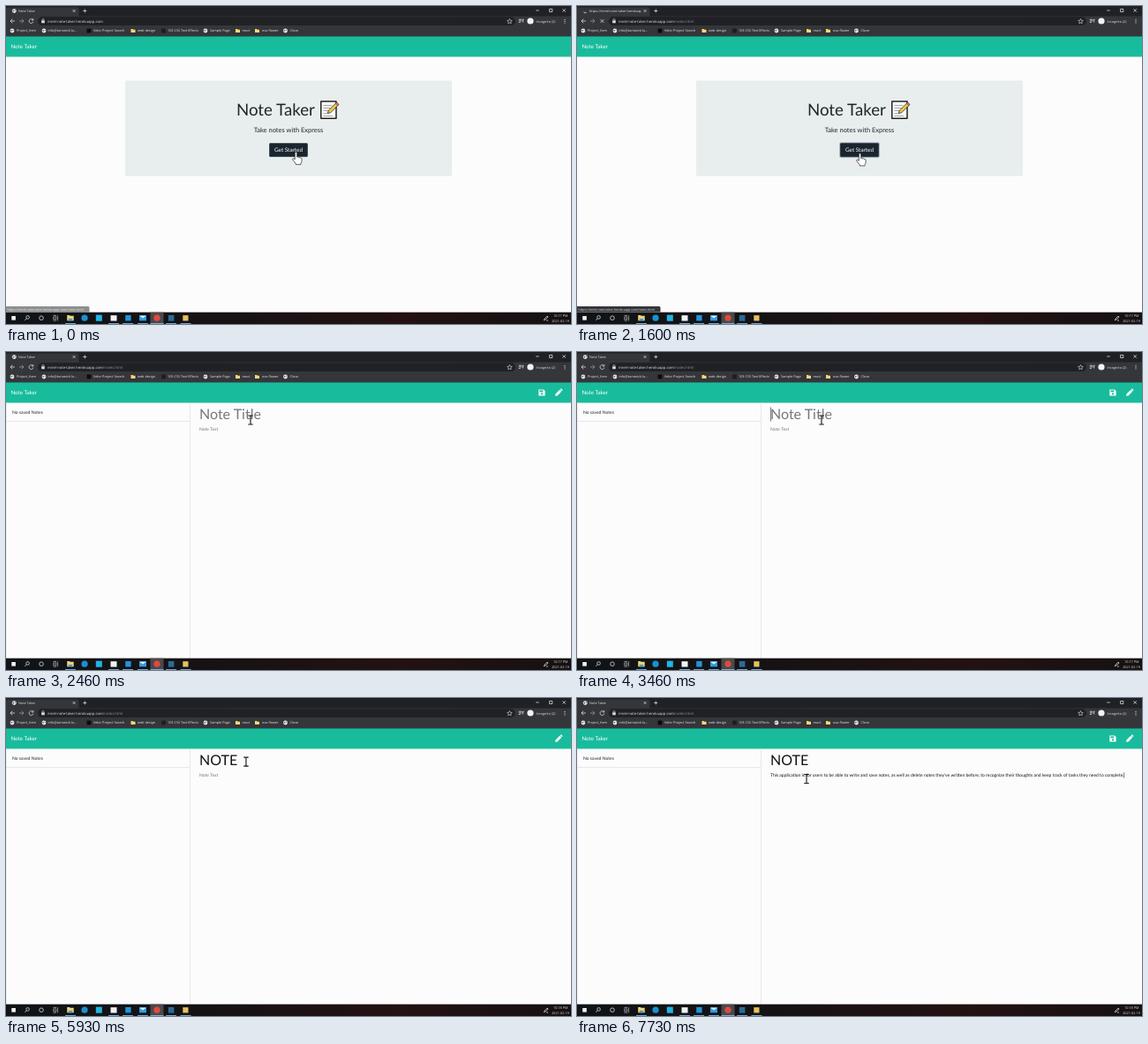
An HTML page for the animation above (8000 ms loop, 640 px wide and 360 px high).

```html
<!DOCTYPE html>
<html lang="en">
<head>
<meta charset="utf-8">
<title>Note Taker</title>
<style>
html, body { margin: 0; width: 100%; height: 100%; overflow: hidden; background: #fcfcfc; }
svg { display: block; width: 100vw; height: 100vh; text-rendering: geometricPrecision; }
text { white-space: pre; }
.ui { font-family: "Open Sans", "Noto Sans", sans-serif; font-size: 3.8px; fill: #e4e5e7; }
.page { font-family: Lato, sans-serif; font-size: 5px; fill: #212529; }
.line { fill: none; stroke: #dcdde0; stroke-width: .8; }
</style>
</head>
<body>
<svg viewBox="0 0 640 360" xmlns="http://www.w3.org/2000/svg">
  <defs>
    <linearGradient id="barFill">
      <stop offset="0" stop-color="#101417"/>
      <stop offset=".4" stop-color="#171213"/>
      <stop offset=".7" stop-color="#241112"/>
      <stop offset="1" stop-color="#151112"/>
    </linearGradient>
    <clipPath id="tabClip"><rect width="72.5" height="11"/></clipPath>
    <g id="globe">
      <circle r="2.4" fill="#e8eaed"/>
      <path d="M-1.7-.9L.1-.5-.4.8-1.3.6zM.6-1.7L1.7-.6.9.1z" fill="#4a4c50"/>
    </g>
    <path id="folder" d="M-2.5-2h2l.7.7h2.3v3.3h-5z" fill="#f8d775"/>
  </defs>

  <rect width="640" height="360" fill="#fcfcfc"/>

  <!-- browser window -->
  <g class="ui">
    <rect width="640" height="35" fill="#202124"/>
    <path d="M0 11.5V4q0-2.5 2.5-2.5H80q2.5 0 2.5 2.5v7.5H640V35H0z" fill="#35363a"/>
    <rect x="36" y="12.3" width="541" height="9.8" rx="4.9" fill="#202124"/>
    <use id="favicon" href="#globe" x="9.3" y="5.6"/>
    <path id="spinner" class="line" d="M0-2.2A2.2 2.2 0 0 1 2.2 0"/>
    <text id="tabName" x="14" y="7" clip-path="url(#tabClip)"></text>
    <path class="line" d="M75.8 4.2l2.6 2.6m0-2.6l-2.6 2.6M87.3 5.5h4m-2-2v4"/>
    <path class="line" stroke-width=".6" d="M600.3 5h3.4M615.6 3.4h3.2v3.2h-3.2zM630.5 3.3l3.4 3.4m0-3.4l-3.4 3.4"/>
    <path class="line" d="M10 17H5m2.3-2.3L5 17l2.3 2.3"/>
    <path class="line" style="stroke:#96989b" d="M15 17h5m-2.3-2.3L20 17l-2.3 2.3"/>
    <path id="reload" class="line" d="M30.4 15.6A2.4 2.4 0 1 0 30.9 17.6M30.8 14.2v1.8H29"/>
    <path id="stop" class="line" d="M26.6 15.1l3.8 3.8m0-3.8l-3.8 3.8"/>
    <path d="M40.2 16.3h3.6v3h-3.6z" fill="#dcdde0"/>
    <path class="line" style="stroke-width:.6" d="M40.9 16.4v-.8a1.1 1.1 0 0 1 2.2 0v.8"/>
    <text x="47" y="18.7" font-size="4.15" style="font-size:4.15px">mirel-note-taker.herokuapp.com<tspan id="path" fill="#92959a">/notes.html</tspan></text>
    <path class="line" style="stroke-width:.6" d="M570.5 14.5l.8 1.8 2 .2-1.5 1.3.4 2-1.7-1-1.7 1 .4-2-1.5-1.3 2-.2z"/>
    <path class="line" d="M580.8 15.3h3.6m-3.6 1.6h3.6m-3.6 1.6h2M585.6 15v3.5m0-3.2h1"/>
    <circle cx="594" cy="17" r="3.6" fill="#f1f3f4"/>
    <text x="600.5" y="18.5">Incognito (2)</text>
    <path d="M633 15v4.6" stroke="#dcdde0" stroke-dasharray="1 .8"/>
    <g id="bookmarks"></g>
  </g>

  <!-- page -->
  <g class="page">
    <rect y="34.5" width="640" height="23" fill="#18bc9c"/>
    <text x="5.4" y="48.2" fill="#fff" style="font-size:6.25px">Note Taker</text>

    <g id="home">
      <rect x="135" y="84.5" width="370" height="108" fill="#e8eeee"/>
      <text x="261" y="124" style="font-size:18.67px">Note Taker</text>
      <g stroke-linejoin="round">
        <path d="M356.8 108h17.2v19.3h-17.2z" fill="#fff" stroke="#222" stroke-width="1.5"/>
        <path d="M359.3 112.5h10m-10 3h8m-8 3h6m-6 3h4m-4 3h11" stroke="#8a8f94" stroke-width=".8"/>
        <path d="M364.2 121.7l1.2-3.6 8.7-8.5 2.5 2.3-8.8 8.7z" fill="#f7c948" stroke="#222" stroke-width=".8"/>
        <path d="M373.2 110.4l1.6-1.3 2.3 2.2-1.5 1.5z" fill="#e8737c" stroke="#222" stroke-width=".5"/>
      </g>
      <text x="320" y="143.2" text-anchor="middle" style="font-size:7.5px">Take notes with Express</text>
      <rect id="ring" x="297.2" y="154.3" width="45.6" height="17.4" rx="2" fill="#a0aab3"/>
      <rect x="298.2" y="155.3" width="43.6" height="15.4" rx="1.2" fill="#1a252f"/>
      <text x="320" y="165.3" text-anchor="middle" fill="#fff" style="font-size:6.35px">Get Started</text>
    </g>

    <g id="notes">
      <path d="M0 78.5h208.5M208.5 57.5V347M.3 57.5V347" stroke="#e3e4e5" stroke-width=".8"/>
      <text x="7" y="70">No saved Notes</text>
      <g id="save">
        <path d="M603.3 42.4h5.7l1.6 1.6v5.6h-7.3z" fill="#fff"/>
        <path d="M604.4 43.4h3.9v1.9h-3.9z" fill="#18bc9c"/>
        <circle cx="607" cy="47.4" r="1.1" fill="#18bc9c"/>
      </g>
      <path d="M622 49.8l.5-2.4 4.7-4.7 2 2-4.7 4.7zM627.7 42.2l.7-.6q.4-.3.8 0l1.1 1.1q.4.4 0 .8l-.7.7z" fill="#fff"/>
      <text id="title" x="219" y="76.3" style="font-size:16px"></text>
      <text id="body" x="219" y="89.3"></text>
      <rect id="caret" width=".6" fill="#222"/>
    </g>
  </g>

  <g id="status" class="ui">
    <path d="M0 340h93q1.5 0 1.5 1.5v5H0z" fill="#35363a"/>
    <text x="1.5" y="344.7" style="font-size:3.6px">https://mirel-note-taker.herokuapp.com/notes.html</text>
  </g>

  <!-- taskbar -->
  <g class="ui">
    <rect y="346.7" width="640" height="13.3" fill="url(#barFill)"/>
    <rect x="163.5" y="346.7" width="15" height="13.3" fill="#4b4849"/>
    <rect x="6.3" y="351" width="4.6" height="4.6" fill="#f2f2f2"/>
    <circle class="line" cx="24.6" cy="352.4" r="1.8"/>
    <path class="line" d="M23.3 353.8l-2 2"/>
    <circle class="line" cx="40" cy="353.2" r="2.3"/>
    <path class="line" style="stroke-width:.6" d="M53.7 352h3.2v2.6h-3.2zM53.5 350.4h3.6M53.5 356.2h3.6M58.6 350.3v6"/>
    <path d="M69.2 350h2.7l.8.8h4v5.5h-7.5z" fill="#f7d36b"/>
    <path d="M70.7 353.8h4.5v2.5h-4.5z" fill="#3f9fe0"/>
    <circle cx="89" cy="353.2" r="3.6" fill="#1d8fd0"/>
    <rect x="101.8" y="349.7" width="7" height="7" fill="#22b4e6"/>
    <rect x="118.5" y="350.2" width="7" height="6.3" fill="#f2f2f2"/>
    <rect x="135.2" y="350" width="6.4" height="6.4" fill="#2493db"/>
    <path d="M151 350.5h8v5.8h-8z" fill="#2e9be6"/>
    <path d="M151 350.5l4 3 4-3z" fill="#e8f4fc"/>
    <circle cx="171" cy="353.2" r="3.6" fill="#dc4b3e"/>
    <rect x="183.8" y="350" width="6.6" height="6.6" fill="#2b6c94"/>
    <rect x="200.3" y="350.2" width="6.2" height="6.2" fill="#e6c25c"/>
    <path d="M67 359.5h12M116 359.5h12M132 359.5h12M149 359.5h12M163.5 359.5h15M181 359.5h12M197.500 359.5h12" stroke="#76b9ed" stroke-width=".9"/>
    <path class="line" d="M609.3 355.7l1-1.9 2.8-2.8 1 1-2.8 2.8zM612 356h2"/>
    <text id="clock" x="636.500" y="352.300" text-anchor="end"></text>
    <text x="638" y="358.400" text-anchor="end">2021-02-19</text>
  </g>

  <path id="hand" d="M-1.200.5Q-1.200-.7 0-.7T1.200.5V5Q2.600 4.300 3.200 5.400 4.600 4.900 5.100 6 6.600 5.800 6.600 7.300V9.300Q6.500 11 5.500 12.300V13.400H-.300V12.300L-3.700 8.100Q-4.200 6.600-2.800 6.500L-1.200 7.700z" fill="#fff" stroke="#222" stroke-width=".7"/>
  <path id="beam" d="M-2.700-5h2L0-4.500.7-5h2M0-4.500v9M-2.700 5h2L0 4.500.7 5h2" fill="none" stroke="#111" stroke-width="1.100"/>
</svg>

<script>
const $ = id => document.getElementById(id);
const LOOP = 8000, BLINK = 530;
const CLICK = 1130, LOAD = 1200, OPEN = 1730, FOCUS = 3000, TEXT_FOCUS = 6400, PASTE = 7260;
const KEYS = [4200, 4330, 4660, 5000];
const SENTENCE = "This application is for users to be able to write and save notes, as well as delete notes they've written before, to recognize their thoughts and keep track of tasks they need to complete.";

// time, x, y of the pointer
const POINTER = [
  [0, 328.5, 166], [600, 320.5, 167.5], [1660, 320.5, 167.5],
  [1930, 284.3, 90.5], [2460, 277, 77], [5870, 277, 77],
  [5930, 272, 72], [6400, 260, 91.5]
];

const BOOKMARKS = [
  ["globe", 7, 12, "Project_Item"], ["globe", 43, 47.5, "info@tarnwick-lu..."],
  ["#0b0b0b", 94, 99, "Velor Project Search"], ["folder", 144, 149, "web design"],
  ["#1d1d1f", 178.5, 183, "103 CSS Text Effects"], ["globe", 226, 231, "Sample Page"],
  ["folder", 262.5, 267.5, "react"], ["folder", 284.5, 290, "osa-flower"],
  ["globe", 316.5, 321.5, "Close"]
];

$("bookmarks").innerHTML = BOOKMARKS.map(([icon, x, textX, name]) =>
  (icon[0] === "#"
    ? `<rect x="${x - 2.4}" y="25.6" width="4.8" height="4.8" fill="${icon}"/>`
    : `<use href="#${icon}" x="${x}" y="28"/>`) +
  `<text x="${textX}" y="29.4">${name}</text>`).join("");

const clamp = v => Math.max(0, Math.min(1, v));
const show = (id, on) => { $(id).style.display = on ? "" : "none"; };
const setText = (id, s) => { if ($(id).textContent !== s) $(id).textContent = s; };

function pointerAt(t) {
  const i = POINTER.findIndex(p => p[0] > t);
  if (i < 0) return POINTER.at(-1).slice(1);
  const [a, b] = [POINTER[i - 1], POINTER[i]];
  const u = (t - a[0]) / (b[0] - a[0]);
  const e = u * (2 - u);
  return [a[1] + (b[1] - a[1]) * e, a[2] + (b[2] - a[2]) * e];
}

function field(id, value, hint) {
  setText(id, value || hint);
  $(id).style.fill = value ? "#111" : "#777";
  return 219 + (value ? $(id).getComputedTextLength() : 0);
}

function draw(t) {
  const loading = t >= LOAD && t < OPEN, open = t >= OPEN;

  // browser
  show("favicon", !loading);
  show("spinner", loading);
  $("spinner").setAttribute("transform", `translate(9.3 5.6) rotate(${-t * .36})`);
  setText("tabName", loading ? "https://mirel-note-taker.herokuapp.com" : "Note Taker");
  show("reload", !loading);
  show("stop", loading);
  show("path", t >= LOAD);
  $("status").style.opacity = t < OPEN ? clamp(.55 + t / 450) : clamp(1 - (t - OPEN) / 430);
  setText("clock", t < 5260 ? "10:17 PM" : "10:18 PM");

  // page
  show("home", !open);
  show("notes", open);
  $("ring").style.opacity = clamp((t - CLICK) / 150);
  if (open) {
    const typed = KEYS.filter(k => k <= t);
    const titleEnd = field("title", "NOTE".slice(0, typed.length), "Note Title");
    const bodyEnd = field("body", t >= PASTE ? SENTENCE : "", "Note Text");
    show("save", t < KEYS[0] || t >= PASTE + 70);

    const inBody = t >= TEXT_FOCUS;
    const since = Math.max(...[FOCUS, TEXT_FOCUS, PASTE, ...KEYS].filter(k => k <= t));
    show("caret", t >= FOCUS && Math.floor((t - since) / BLINK) % 2 === 0);
    $("caret").setAttribute("x", inBody ? bodyEnd : titleEnd + .2);
    $("caret").setAttribute("y", inBody ? 84.3 : 62.5);
    $("caret").setAttribute("height", inBody ? 6.3 : 16);
  }

  // pointer
  const at = `translate(${pointerAt(t)})`;
  $("hand").setAttribute("transform", at);
  $("beam").setAttribute("transform", at);
  show("hand", !open);
  show("beam", open);
}

const start = performance.now();
function tick() {
  draw((performance.now() - start) % LOOP);
  requestAnimationFrame(tick);
}
tick();
</script>
</body>
</html>
```
